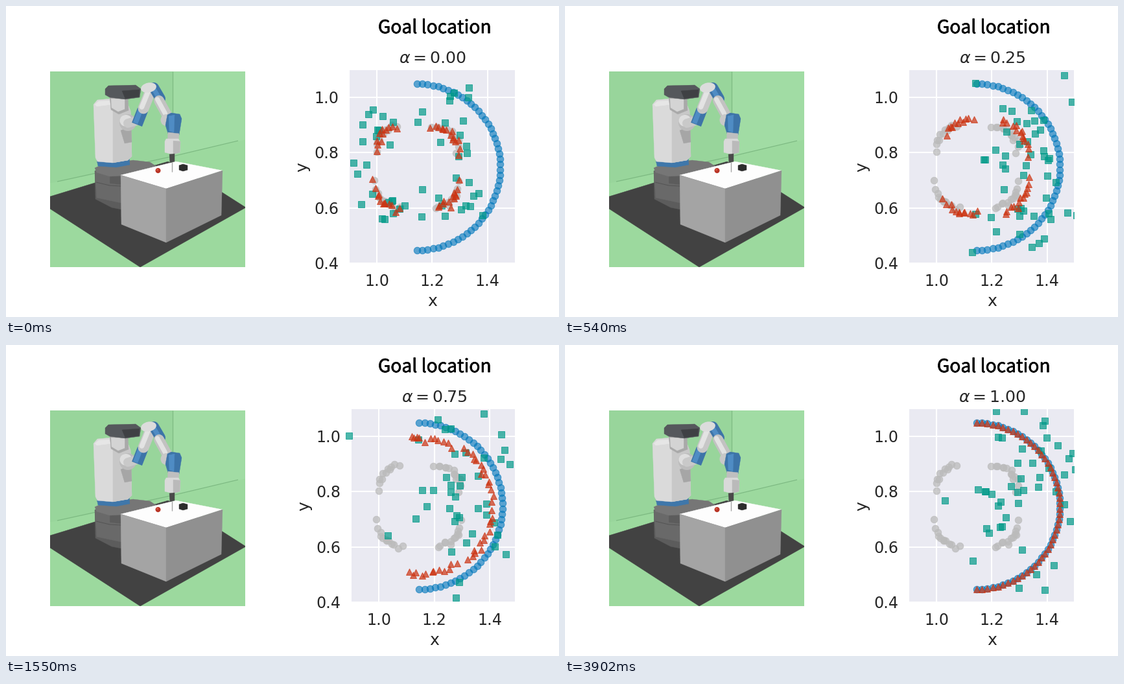
Animation of 853x480 px, one loop 5.11 s. Source, as a matplotlib script:

```python
from itertools import count

import matplotlib.pyplot as plt
import numpy as np
from matplotlib.animation import FuncAnimation
from matplotlib.patches import Ellipse, Polygon, Rectangle
from matplotlib.patheffects import withStroke
from matplotlib.transforms import Affine2D

WIDTH, HEIGHT = 853, 480
LOOP, STEP = 5110, 14
STARTS = (0, 540, 1080, 1550, 2090)
SHIFTS = (-1, 0, 0, 2.5, 0)  # sideways offset of the chart in each state
BLUE, TEAL, RED, GREY, INK = "#0077BB", "#009988", "#CC3311", "#BBBBBB", "#262626"

fig = plt.figure(figsize=(WIDTH / 72, HEIGHT / 72), dpi=72, facecolor="white")
ax = fig.add_axes((0, 0, 1, 1))
ax.set(xlim=(0, WIDTH), ylim=(HEIGHT, 0))
ax.axis("off")
layer = count(1)


# --- Robot scene ---------------------------------------------------------

def add(patch, clip=None):
    patch.set_zorder(next(layer))
    ax.add_patch(patch)
    if clip is not None:
        patch.set_clip_path(clip)
    return patch


room = add(Rectangle((68.5, 101), 301, 301.5, fc="#9cd99e", lw=0))


def poly(color, *numbers):
    points = np.reshape(numbers, (-1, 2))
    add(Polygon(points, fc=color, ec=color, lw=0.4), room)


def oval(color, x, y, w, h, angle=0):
    add(Ellipse((x, y), w, h, angle=angle, fc=color, lw=0), room)


def stroke(color, width, *numbers, cap="butt"):
    ax.plot(numbers[::2], numbers[1::2], color=color, lw=width, solid_capstyle=cap,
            solid_joinstyle="round", zorder=next(layer), clip_path=room)


def limb(shade, light, width, x0, y0, x1, y1, cap="round"):
    """A tube with a lit stripe along its left side."""
    stroke(shade, width, x0, y0, x1, y1, cap=cap)
    stroke(light, width * 0.45, x0 - 2.5, y0 - 2, x1 - 2.5, y1 - 2, cap=cap)


def draw_room():
    poly("#98d59b", 68, 101, 257, 101, 257, 236, 68, 273)
    poly("#a1dca4", 257, 101, 370, 101, 370, 206, 257, 232)
    stroke("#7cb981", 1.2, 257, 101, 257, 236)
    stroke("#7cb981", 1.2, 79, 271, 257, 232, 358, 208)
    poly("#424242", 68, 294, 140, 272, 250, 240, 334, 288, 370, 311, 207, 403, 68, 313)


def draw_base():
    poly("#5c5c5c", 137, 255, 150, 246, 232, 246, 232, 258, 178, 262, 178, 314,
         163, 311, 138, 298)
    poly("#696969", 137, 254, 160, 262, 160, 274, 178, 276, 178, 304, 140, 296)
    poly("#767676", 137, 250, 150, 244, 196, 238, 222, 241, 231, 247, 178, 262,
         160, 263, 140, 257)
    stroke("#545454", 1, 139, 272, 160, 277, 178, 278)
    poly("#3f77aa", 140, 238, 190, 234, 191, 245, 170, 249, 142, 247)


def draw_torso():
    poly("#dadada", 135, 152, 141, 145, 162, 143, 188, 152, 192, 162, 194, 232,
         188, 238, 164, 242, 141, 240, 138, 234)
    poly("#c8c8c8", 165, 152, 188, 153, 192, 162, 194, 232, 188, 238, 165, 242)
    poly("#e6e6e6", 137, 152, 143, 147, 162, 146, 163, 152, 140, 155)
    poly("#a9a9a9", 160, 140, 188, 140, 189, 161, 174, 167, 162, 160)
    poly("#d4d4d4", 162, 143, 183, 144, 183, 159, 173, 163, 163, 157)
    poly("#a6a6a6", 177, 192, 193, 186, 194, 210, 183, 212)
    poly("#55585c", 153, 128, 158, 123, 200, 122, 208, 128, 206, 141, 184, 144,
         160, 141, 153, 137)
    poly("#3f4144", 179, 131, 206, 129, 205, 140, 184, 143)


def draw_arm():
    oval("#bcbcbc", 188, 180, 26, 26)
    oval("#dedede", 185, 177, 19, 18)
    stroke("#c9c9c9", 14, 188, 181, 202, 177, cap="round")
    limb("#3d74a8", "#4f8cc4", 17, 202, 183, 211, 160, cap="butt")
    limb("#c7c7c7", "#e3e3e3", 17, 212, 158, 223, 131)
    limb("#3d74a8", "#4f8cc4", 16, 228, 126, 238, 143)
    oval("#dcdcdc", 220, 126, 24, 15, -12)
    limb("#c2c2c2", "#e2e2e2", 16, 236, 146, 248, 168)
    oval("#c8c8c8", 247, 176, 17, 18)
    poly("#3d74a8", 249, 168, 255, 165, 268, 167, 271, 174, 267, 199, 250, 197,
         246, 184)
    poly("#4f8cc4", 251, 170, 260, 168, 259, 195, 252, 193)
    poly("#bfbfbf", 250, 195, 267, 197, 266, 208, 249, 208)


def draw_table():
    poly("#fdfdfd", 177, 261, 262, 240, 334, 254, 247, 282)
    poly("#a4a4a4", 177, 261, 247, 282, 247, 365, 178, 337)
    poly("#909090", 247, 282, 334, 254, 332, 323, 247, 365)
    poly("#2c2c2c", 267, 246, 273, 244, 280, 246, 280, 253, 273, 255, 267, 253)
    oval("#b93526", 234.5, 254, 8, 8)
    oval("#d65a46", 233.5, 252.8, 3, 3)


def draw_gripper():
    poly("#d9d9d9", 247, 205, 266, 205, 269, 210, 268, 226, 257, 229, 245, 226, 245, 209)
    poly("#bababa", 258, 208, 269, 209, 268, 226, 258, 229)
    poly("#4a4a4a", 252, 229, 260, 228, 260, 240, 253, 242)
    stroke("#a5a5a5", 1.4, 256.5, 241, 256.5, 256)


for draw in (draw_room, draw_base, draw_torso, draw_arm, draw_table, draw_gripper):
    draw()

# --- Chart data, in stage pixels -----------------------------------------

CENTRE = np.array((635, 248.5))
CLOUD = np.array((714, 245))


def make_arc():
    turn = np.linspace(0, np.pi, 50)
    return CENTRE + 128.3 * np.column_stack((np.sin(turn), -np.cos(turn)))


def make_ring(rng):
    """Four corner clusters of a rounded square, clockwise from the left."""
    turn = np.radians(np.concatenate(
        [90 * corner + np.linspace(9, 80, size)
         for corner, size in enumerate((11, 14, 13, 12))]))
    wave = -np.column_stack((np.cos(turn), np.sin(turn)))
    return CENTRE + 62.5 * np.sign(wave) * np.abs(wave) ** 0.5 + rng.normal(0, 2.5, wave.shape)


arc = make_arc()
ring = make_ring(np.random.default_rng(7))


def goals(alpha, rng):
    """Ring points carried towards their partners on the arc."""
    noise = rng.normal(0, 2, ring.shape) * (alpha < 1)
    return (1 - alpha) * ring + alpha * arc + noise


def baseline(alpha, rng):
    """Points that leave the ring at once and spread into a wide cloud."""
    reach = min(1, 4 * alpha)
    home = CENTRE + 1.15 * (ring - CENTRE)
    spread = 20 + reach * np.array((28, 60))
    return (1 - reach) * home + reach * CLOUD + rng.normal(0, 1, ring.shape) * spread


alphas = np.linspace(0, 1, len(STARTS))
red_points = [goals(a, np.random.default_rng(i)) for i, a in enumerate(alphas)]
teal_points = [baseline(a, np.random.default_rng(i + 20)) for i, a in enumerate(alphas)]

# --- Chart ---------------------------------------------------------------

slide = Affine2D()
sliding = slide + ax.transData
window = Rectangle((500, 99), 285, 298, transform=ax.transData)
add(Rectangle((531, 99), 280, 298, fc="#EAEAF2", lw=0, transform=sliding), window)


def grid_line(xs, ys):
    ax.plot(xs, ys, color="white", lw=2, zorder=next(layer),
            transform=sliding, clip_path=window)


def markers(points, shape, color, transform=sliding, alpha=0.7):
    line, = ax.plot(*points.T, shape, color=color, alpha=alpha, ms=10.5, mew=1,
                    zorder=next(layer), transform=transform)
    line.set_clip_path(window)
    return line


def label(x, y, text, size=25.3, **options):
    settings = dict(ha="center", va="baseline", color=INK, transform=sliding,
                    family="DejaVu Sans") | options
    return ax.text(x, y, text, fontsize=size, **settings)


for i in range(3):
    x = 573 + 85.3 * i
    grid_line((x, x), (99, 397))
    label(x, 432, f"{1 + 0.2 * i:.1f}", 23.7)
for i in range(4):
    y = 141 + 85.4 * i
    grid_line((531, 811), (y, y))
    label(514, y + 8.8, f"{1 - 0.2 * i:.1f}", 23.7, ha="right")

markers(ring, "o", GREY, alpha=0.75)
markers(arc, "o", BLUE, alpha=0.62)
squares = markers(teal_points[0], "s", TEAL, ax.transData)
triangles = markers(red_points[0], "^", RED)

label(658.3, 463, "x")
label(465, 248.5, "y", rotation=90, rotation_mode="anchor")
title = label(658.7, 87.5, "")
label(661.5, 42, "Goal location", 28.2, color="black", transform=ax.transData,
      family="Noto Sans CJK JP",
      path_effects=[withStroke(linewidth=0.6, foreground="black")])


def update(frame):
    frame_end = (frame + 1) * STEP - 1
    state = np.searchsorted(STARTS, frame_end, side="right") - 1
    slide.clear().translate(SHIFTS[state], 0)
    squares.set_data(*teal_points[state].T)
    triangles.set_data(*red_points[state].T)
    title.set_text(rf"$\alpha = {alphas[state]:.2f}$")
    return squares, triangles, title


animation = FuncAnimation(fig, update, frames=LOOP // STEP, interval=STEP,
                          repeat=True, repeat_delay=0, blit=False)
plt.show()
```
